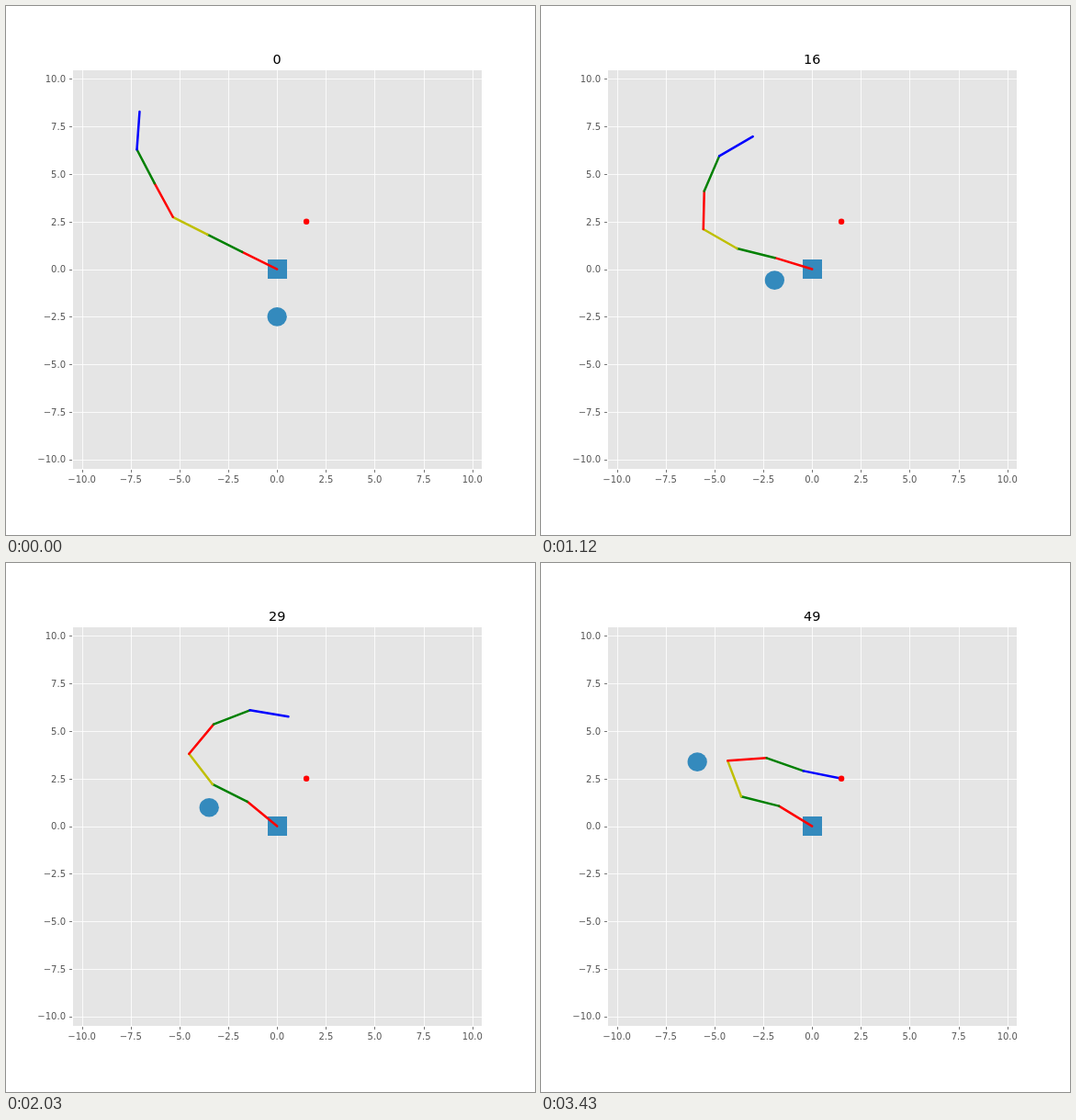
An HTML page with a canvas that plays this animation: 576x576 px, repeating every 3500 ms.

```html
<!DOCTYPE html>
<html lang="en">
<head>
<meta charset="utf-8">
<title>Robot arm</title>
<style>
html, body { margin: 0; width: 100%; height: 100%; overflow: hidden; background: #fff; }
canvas { display: block; }
</style>
</head>
<body>
<canvas id="stage" width="576" height="576"></canvas>
<script>
const ctx = document.getElementById('stage').getContext('2d');
const STEP = 70, STEPS = 50, LINK = 2;
const LEFT = 72, RIGHT = 518.4, TOP = 69.12, BOTTOM = 504;
const FONT = '"DejaVu Sans", sans-serif';
const COLORS = ['#f00', '#008000', '#bfbf00', '#f00', '#008000', '#00f'];

// Absolute link angles in degrees at a few key steps
const KEYS = [0, 5, 16, 24, 29, 37, 49];
const ANGLES = [
  [153.2, 162, 162.6, 145.7, 139.8, 135.8, 148],
  [152.8, 163.4, 165.8, 154, 152.8, 153.5, 165.4],
  [152.4, 156.2, 149.5, 131.9, 127, 121, 110.3],
  [118, 113.3, 88.7, 62.5, 51, 34.2, 4.1],
  [117, 102.9, 67.3, 34.8, 21.7, 2.9, -19.8],
  [86, 68.8, 30.8, 1, -9.7, -21.4, -11.5]
];

const px = x => (LEFT + RIGHT) / 2 + x * (RIGHT - LEFT) / 21;
const py = y => (TOP + BOTTOM) / 2 - y * (BOTTOM - TOP) / 21;
const snap = v => Math.round(v) + 0.5;

// Smooth cubic curve through unevenly spaced keys
function spline(v, t) {
  const last = KEYS.length - 1;
  const gap = i => KEYS[i + 1] - KEYS[i];
  const rate = i => (v[i + 1] - v[i]) / gap(i);
  const inner = i => (gap(i) * rate(i - 1) + gap(i - 1) * rate(i)) / (gap(i - 1) + gap(i));
  const slope = i =>
    i === 0 ? (3 * rate(0) - inner(1)) / 2 :
    i === last ? (3 * rate(last - 1) - inner(last - 1)) / 2 : inner(i);
  let i = 0;
  while (i < last - 1 && t > KEYS[i + 1]) i++;
  const h = gap(i), u = (t - KEYS[i]) / h, w = 1 - u;
  return w * w * (1 + 2 * u) * v[i] + u * u * (3 - 2 * u) * v[i + 1]
    + h * u * w * (w * slope(i) - u * slope(i + 1));
}

function line(x1, y1, x2, y2, color, width) {
  ctx.strokeStyle = color;
  ctx.lineWidth = width;
  ctx.beginPath();
  ctx.moveTo(x1, y1);
  ctx.lineTo(x2, y2);
  ctx.stroke();
}

function ellipse(x, y, rx, ry, color) {
  ctx.fillStyle = color;
  ctx.beginPath();
  ctx.ellipse(x, y, rx, ry, 0, 0, 2 * Math.PI);
  ctx.fill();
}

function text(str, x, y, size, align, color) {
  ctx.font = size + 'px ' + FONT;
  ctx.textAlign = align;
  ctx.fillStyle = color;
  ctx.fillText(str, x, y);
}

function drawAxes() {
  ctx.fillStyle = '#fff';
  ctx.fillRect(0, 0, 576, 576);
  ctx.fillStyle = '#e5e5e5';
  ctx.fillRect(72, 69, 446, 435);
  ctx.lineCap = 'butt';
  for (let v = -10; v <= 10; v += 2.5) {
    const x = snap(px(v)), y = snap(py(v));
    const label = (v < 0 ? '\u2212' : '') + Math.abs(v).toFixed(1);
    line(x, TOP, x, BOTTOM, '#fff', 0.8);
    line(LEFT, y, RIGHT, y, '#fff', 0.8);
    line(x, 504.5, x, 508, '#555', 0.8);
    line(69, y, 72.5, y, '#555', 0.8);
    text(label, px(v), 519, 10, 'center', '#555');
    text(label, 65, Math.round(py(v) + 3.8), 10, 'right', '#555');
  }
  ctx.strokeStyle = '#fff';
  ctx.lineWidth = 1;
  ctx.strokeRect(72.5, 69.5, 446, 435);
}

function draw(step) {
  drawAxes();
  text(step, px(0), 63, 14.4, 'center', '#000');

  ctx.fillStyle = '#348abd';
  ctx.fillRect(285, 276, 21, 21);
  ellipse(px(-0.12 * step), py(-2.5 + 0.12 * step), 10.63, 10.35, '#348abd');

  ctx.lineCap = 'round';
  let x = 0, y = 0;
  ANGLES.forEach((keys, i) => {
    const a = spline(keys, step) * Math.PI / 180;
    const nx = x + LINK * Math.cos(a), ny = y + LINK * Math.sin(a);
    line(px(x), py(y), px(nx), py(ny), COLORS[i], 2.5);
    x = nx;
    y = ny;
  });
  ellipse(px(1.5), py(2.5), 3.2, 3.2, '#f00');
}

const start = performance.now();
function tick() {
  draw(Math.floor((performance.now() - start) / STEP) % STEPS);
  requestAnimationFrame(tick);
}
tick();
</script>
</body>
</html>
```
